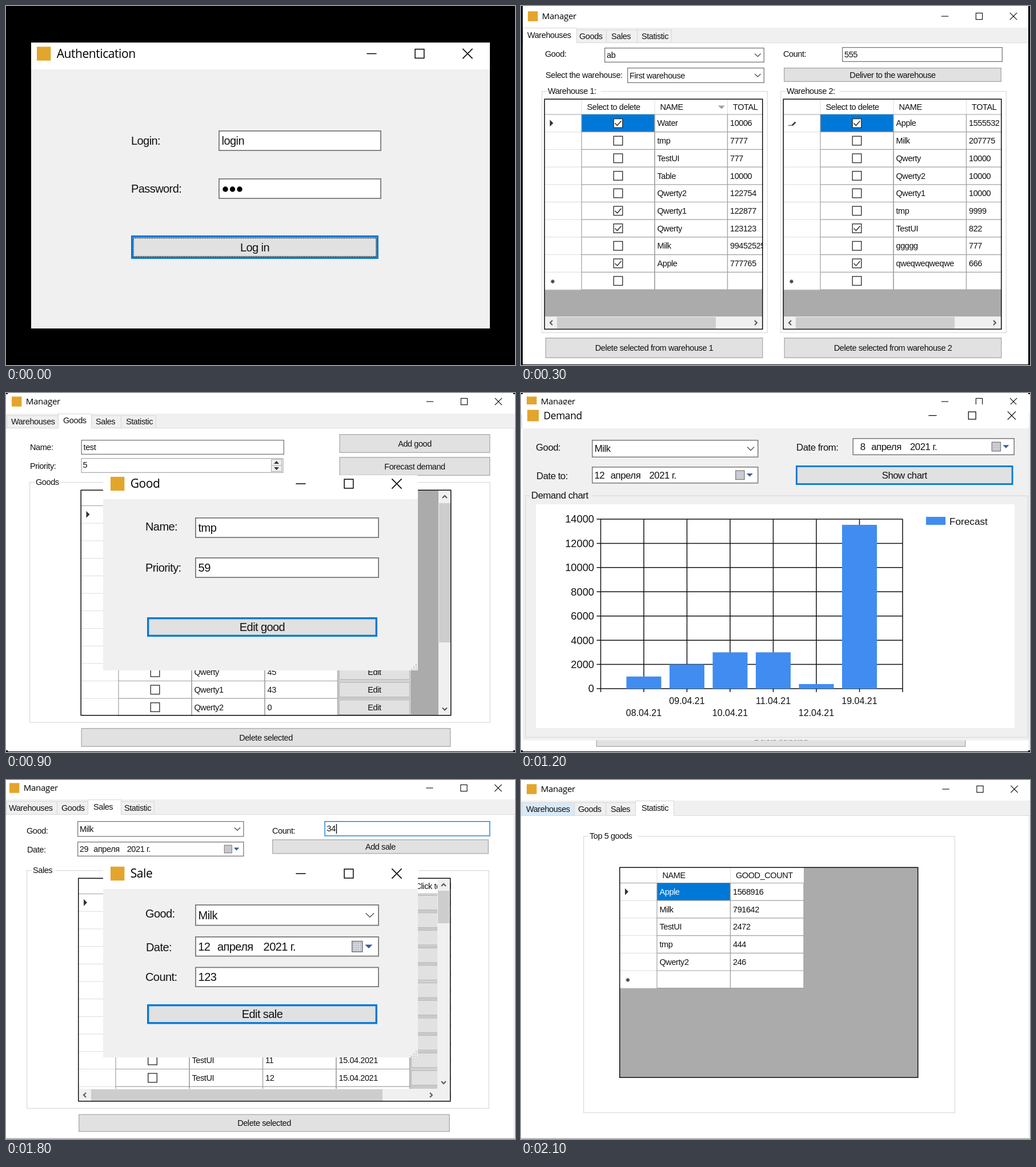
An HTML page that plays this animation: 891x629 px, repeating every 2400 ms.

```html
<!DOCTYPE html>
<html lang="en">
<head>
<meta charset="utf-8">
<title>Warehouse manager</title>
<style>
  html, body { margin: 0; width: 100%; height: 100%; overflow: hidden; background: #000; }
  #stage { display: block; width: 891px; height: 629px; }
  text { font-family: "Liberation Sans", Arial, sans-serif; letter-spacing: -.029em; }
  .title { font-family: "Open Sans", "Noto Sans", sans-serif; letter-spacing: -.02em; }
  .chart { letter-spacing: 0; }
  .scene { visibility: hidden; animation: show 2400ms step-end infinite; }
  @keyframes show {
    0% { visibility: visible; }
    12.5%, 100% { visibility: hidden; }
  }
</style>
</head>
<body>
<svg id="stage" viewBox="0 0 891 629"></svg>
<script>
const UI = 14.5, BLUE = '#0078d7', FACE = '#f0f0f0', LINE = '#dcdcdc', EDGE = '#7a7a7a', BUTTON = '#e1e1e1';

// Basic shapes; boxes are given by their outer edges
function rect(x0, y0, x1, y1, fill, stroke, w = 1) {
  const i = stroke ? w / 2 : 0;
  const pen = stroke ? ` stroke="${stroke}" stroke-width="${w}"` : '';
  return `<rect x="${x0 + i}" y="${y0 + i}" width="${x1 - x0 - 2 * i}" height="${y1 - y0 - 2 * i}" fill="${fill}"${pen}/>`;
}
const path = (d, stroke, w = 1, fill = 'none') => `<path d="${d}" stroke="${stroke}" stroke-width="${w}" fill="${fill}"/>`;
const fillPath = (d, fill) => `<path d="${d}" fill="${fill}"/>`;
const dot = (x, y, r, fill) => `<circle cx="${x}" cy="${y}" r="${r}" fill="${fill}"/>`;

function text(x, cy, s, size = UI, { anchor = 'start', fill = '#111', cls = '' } = {}) {
  return `<text class="${cls}" x="${x}" y="${cy + size * .35}" font-size="${size}" text-anchor="${anchor}" fill="${fill}">${s}</text>`;
}
const centred = (x, cy, s, size) => text(x, cy, s, size, { anchor: 'middle' });

// Thin arrow head: dx, dy is the direction it points in
function chevron(x, y, dx, dy, r, w = 1.4, colour = '#555') {
  const at = (a, b) => `${x + a * dx - b * dy},${y + a * dy + b * dx}`;
  return path(`M${at(-r / 2, r)} L${at(r / 2, 0)} L${at(-r / 2, -r)}`, colour, w);
}

// Controls
function caption(x, cy, name, size, minX) {
  const r = size * .41, gap = size * 4, half = size * .58;
  const maxX = minX + gap, endX = minX + 2 * gap, w = size / 14;
  return rect(x, cy - half, x + 2 * half, cy + half, '#e3a52c') +
    text(x + size * 1.65, cy, name, size, { cls: 'title', fill: '#000' }) +
    path(`M${minX - r},${cy}h${2 * r}`, '#000', w) +
    rect(maxX - r, cy - r, maxX + r, cy + r, 'none', '#000', w) +
    path(`M${endX - r},${cy - r}l${2 * r},${2 * r}m0,${-2 * r}l${-2 * r},${2 * r}`, '#000', w);
}

function field(x0, y0, x1, y1, s, size = UI, edge = EDGE) {
  return rect(x0, y0, x1, y1, '#fff', edge, size / 11) + text(x0 + size * .28, (y0 + y1) / 2, s, size);
}

function combo(x0, y0, x1, y1, s, size = UI) {
  return field(x0, y0, x1, y1, s, size) + chevron(x1 - size * .8, (y0 + y1) / 2, 0, 1, size * .36);
}

function date(x0, y0, x1, y1, day, size = UI) {
  const cy = (y0 + y1) / 2, x = x0 + size * .25, h = size * .5;
  const left = x1 - size * 2.4, right = x1 - size * 1.42, tri = x1 - size * .9;
  let s = field(x0, y0, x1, y1, '', size) +
    text(x + size * 1.07, cy, day, size, { anchor: 'end' }) +
    text(x + size * 1.7, cy, 'апреля', size) + text(x + size * 5.73, cy, '2021 г.', size) +
    rect(left, cy - h, right, cy + h, '#e4e4ea', '#77777f', size / 12);
  for (let i = 1; i < 5; i++) {
    s += path(`M${left + 2},${cy - h + i * h * .4}H${right - 2}`, '#a9a9b4', .8);
    s += path(`M${left + i * h * .39},${cy - h + 2}V${cy + h - 2}`, '#a9a9b4', .8);
  }
  const t = size * .33;
  return s + fillPath(`M${tri - t},${cy - t / 2}h${2 * t}l${-t},${t}z`, '#3c5a8c');
}

function button(x0, y0, x1, y1, s, size = UI, active = false) {
  return rect(x0, y0, x1, y1, BUTTON, active ? BLUE : '#adadad', active ? size / 6 : 1.4) +
    centred((x0 + x1) / 2, (y0 + y1) / 2, s, size);
}

function group(x0, y0, x1, y1, name, size = UI, back = '#fff') {
  return rect(x0, y0, x1, y1, 'none', LINE, 1.3) +
    rect(x0 + 9, y0 - 4, x0 + 13 + name.length * size * .52, y0 + 4, back) +
    text(x0 + 11, y0, name, size);
}

function check(x, y, on) {
  return rect(x - 8.5, y - 8.5, x + 8.5, y + 8.5, '#fff', '#333', 1.4) +
    (on ? path(`M${x - 5.5},${y}l4,4l7,-8`, '#333', 1.5) : '');
}

function marker(kind, x, y) {
  if (kind === 'arrow') return fillPath(`M${x + 10},${y - 6}l6,6l-6,6z`, '#333');
  if (kind === 'pen') return dot(x + 11, y + 4, 1, '#333') + dot(x + 14, y + 4, 1, '#333') + path(`M${x + 16},${y + 4}l6,-6`, '#333', 2.6);
  return dot(x + 15, y + 1, 2.6, '#333') + path(`M${x + 11},${y + 1}h8m-4,-4v8m-3,-7l6,6m0,-6l-6,6`, '#555', .8);
}

// Data grid; cols holds the column edges, the first column being the row header
function grid({ box, cols, top, heads, rows, first = 'arrow', fresh = false, extra = '' }) {
  const [x0, y0, x1, y1] = box, pitch = 30.7, right = cols[cols.length - 1];
  const list = fresh ? [...rows, [typeof rows[0][0] === 'boolean' ? false : '']] : rows;
  let s = rect(x0, y0, x1, y1, '#ababab') + rect(x0, y0, right, top + list.length * pitch, '#fff');
  heads.forEach((h, i) => {
    s += text(cols[i + 1] + 9.5, (y0 + top) / 2 + .5, h) + path(`M${cols[i + 1]},${y0}V${top}`, LINE);
  });
  s += path(`M${x0},${top}H${right}`, '#a0a0a0', 1.2);
  list.forEach((row, r) => {
    const y = top + r * pitch, cy = y + pitch / 2, end = y + pitch;
    if (!r) s += rect(cols[1], y, cols[2], end, BLUE);
    if (!r) s += marker(first, x0, cy);
    if (fresh && r === rows.length) s += marker('star', x0, cy);
    s += path(`M${x0},${end}H${cols[1]}`, LINE) + path(`M${cols[1]},${end}H${right}`, '#a0a0a0', 1.2);
    heads.forEach((h, i) => {
      const a = cols[i + 1], b = cols[i + 2], v = row[i];
      if (typeof v === 'boolean') s += check((a + b) / 2, cy, v);
      else if (h === 'Click to edit') s += button(a + 1.5, y + 1.5, b - 1.5, end - 1.5, 'Edit');
      else if (v) s += text(a + 4.5, cy, v, UI, { fill: !r && !i ? '#fff' : '#111' });
      s += path(`M${a},${y}V${end}M${b},${y}V${end}`, '#a0a0a0', 1.2);
    });
  });
  return `<svg x="${x0}" y="${y0}" width="${x1 - x0}" height="${y1 - y0}" viewBox="${x0} ${y0} ${x1 - x0} ${y1 - y0}">${s}${extra}</svg>` +
    rect(x0, y0, x1, y1, 'none', '#111', 1.5);
}

const hScroll = (x0, x1, y, a, b) => rect(x0, y, x1, y + 22, FACE) + rect(a, y + 1, b, y + 21, '#cdcdcd') +
  chevron(x0 + 11, y + 11, -1, 0, 4, 2) + chevron(a === x0 + 22 ? x1 - 11 : x1 - 11, y + 11, 1, 0, 4, 2);
const vScroll = (x, y0, y1, a, b) => rect(x, y0, x + 22, y1, FACE) + rect(x + 1, a, x + 21, b, '#cdcdcd') +
  chevron(x + 11, y0 + 11, 0, -1, 4, 2) + chevron(x + 11, y1 - 11, 0, 1, 4, 2);

function tabs(y, bottom, edges, xs, on, hover = -1) {
  const names = ['Warehouses', 'Goods', 'Sales', 'Statistic'];
  const tab = i => {
    const up = i === on;
    return rect(edges[i], up ? y : y + 3, edges[i + 1] + 1, bottom + 1, up ? '#fff' : i === hover ? '#d8eaf9' : FACE, LINE, 1.2) +
      (up ? rect(edges[i] + 1, bottom - 1, edges[i + 1], bottom + 2, '#fff') : '') +
      text(xs[i], (y + bottom) / 2 + (up ? -.5 : 1.5), names[i]);
  };
  const order = [0, 1, 2, 3].filter(i => i !== on);
  return rect(0, y, 891, bottom, FACE) + path(`M0,${bottom + .5}H891`, LINE) + [...order, on].map(tab).join('');
}

function dialog(y0, name, body) {
  return rect(170, y0, 721, 486, FACE) + rect(170, y0, 721, y0 + 42, '#fff') + caption(183, y0 + 15, name, 21, 516) + body +
    [[718, 476], [718, 480], [718, 484], [714, 480], [714, 484], [710, 484]].map(([x, y]) => dot(x, y, 1.1, '#b4b4b4')).join('');
}

// Scenes
function login() {
  return rect(44, 64, 847, 565, FACE) + rect(44, 64, 847, 111, '#fff') + caption(54, 83.5, 'Authentication', 21, 640) +
    text(219, 236, 'Login:', 20) + field(372, 218, 657, 254, 'login', 20) +
    text(219, 320, 'Password:', 20) + field(372, 302, 657, 338, '', 20) +
    [384, 396.5, 409].map(x => dot(x, 321, 4.7, '#000')).join('') +
    button(219, 402, 652, 443, 'Log in', 20, true) +
    '<rect x="223" y="406.5" width="425" height="32.5" fill="none" stroke="#000" stroke-width="1.4" stroke-dasharray="1.5 1.5"/>';
}

function stock(dx, n, rows, first) {
  const thumb = hScroll(42 + dx, 422 + dx, 544, 63 + dx, 341 + dx);
  const sort = first === 'arrow' ? fillPath('M345,174.5h12l-6,6z', '#a0a0a0') : '';
  return group(36 + dx, 149, 432 + dx, 573, `Warehouse ${n}:`) +
    grid({
      box: [40.5 + dx, 162.5, 423.5 + dx, 567], cols: [41, 106, 234, 361.5, 489].map(x => x + dx), top: 190,
      heads: ['Select to delete', 'NAME', 'TOTAL'], rows, first, fresh: true, extra: sort + thumb
    }) +
    button(42.5 + dx, 581, 423.5 + dx, 617, `Delete selected from warehouse ${n}`);
}

function warehouses() {
  const left = [[true, 'Water', '10006'], [false, 'tmp', '7777'], [false, 'TestUI', '777'], [false, 'Table', '10000'],
    [false, 'Qwerty2', '122754'], [true, 'Qwerty1', '122877'], [true, 'Qwerty', '123123'], [false, 'Milk', '994525252'], [true, 'Apple', '777765']];
  const right = [[true, 'Apple', '1555532'], [false, 'Milk', '207775'], [false, 'Qwerty', '10000'], [false, 'Qwerty2', '10000'],
    [false, 'Qwerty1', '10000'], [false, 'tmp', '9999'], [true, 'TestUI', '822'], [false, 'ggggg', '777'], [true, 'qweqweqweqwe', '666']];
  return rect(3, 0, 888, 628, '#fff') + caption(12, 18, 'Manager', 15, 742) +
    tabs(38, 64, [3, 97, 149, 203, 263], [11, 102, 158, 211], 0) +
    text(42, 84, 'Good:') + combo(146, 73, 426, 99, 'ab') + text(459, 84, 'Count:') + field(562, 72, 843, 98, '555') +
    text(43, 121, 'Select the warehouse:') + combo(186, 108, 426, 135, 'First warehouse') +
    button(460, 108, 841, 133, 'Deliver to the warehouse') +
    stock(0, 1, left, 'arrow') + stock(418, 2, right, 'pen') +
    rect(0, 0, 3, 629, '#000') + rect(888, 0, 891, 629, '#000');
}

function goods() {
  const rows = [[true, 'tmp', '59'], [false, 'rewq54rtg', '1'], [false, 'ab', '44'], [false, 'TestUI', '7'], [false, 'rewq', '2'],
    [true, 'Milk', '14'], [true, 'Apple', '26'], [false, 'Table', '1'], [false, 'Water', '100'], [false, 'Qwerty', '45'],
    [false, 'Qwerty1', '43'], [false, 'Qwerty2', '0']];
  return rect(3, 0, 888, 628, '#fff') + rect(0, 2, 891, 626, '#fff') + caption(10, 15, 'Manager', 15, 742) +
    tabs(36, 61, [1, 91, 149, 201, 262], [9, 100, 157, 210], 1) + path('M889.5,62V626', LINE) +
    text(42, 95, 'Name:') + field(131.5, 82, 487, 108, 'test') +
    text(42, 128, 'Priority:') + field(131.5, 114, 485.5, 140, '', UI, '#adadad') + text(134.5, 126, '5') +
    rect(464, 116, 483, 138, FACE, '#adadad') + path('M464,127H483', '#adadad') +
    fillPath('M469,124h9l-4.5,-5zM469,130h9l-4.5,5z', '#333') +
    button(583.5, 72, 847.5, 105, 'Add good') + button(583.5, 112, 847.5, 145, 'Forecast demand') +
    group(41, 156, 848, 578, 'Goods') +
    grid({
      box: [130.5, 169.5, 779.5, 565.5], cols: [131, 197, 325, 453, 581, 709], top: 197.5,
      heads: ['Select to delete', 'NAME', 'PRIORITY', 'Click to edit'], rows,
      extra: vScroll(757, 171, 564.5, 193, 437)
    }) +
    button(131.5, 587, 778.5, 620, 'Delete selected');
}

function editGood() {
  return goods() + dialog(144, 'Good',
    text(244, 234, 'Name:', 20) + field(331, 218, 653, 254, 'tmp', 20) +
    text(244, 306, 'Priority:', 20) + field(331, 288, 653, 324, '59', 20) +
    button(247, 393, 650, 427, 'Edit good', 20, true));
}

function chart() {
  const x0 = 139.5, y0 = 221, base = 518, step = 75.5, scale = (base - y0) / 14000;
  const days = ['08', '09', '10', '11', '12', '19'], values = [1000, 2000, 3000, 3000, 380, 13530];
  let s = rect(26, 195, 864, 587, '#fff');
  for (let v = 0; v <= 14000; v += 2000) {
    const y = base - v * scale;
    s += path(`M${x0 - 7},${y}H668`, '#111', 1.5) + text(128, y, v, 18.3, { anchor: 'end', cls: 'chart' });
  }
  for (let i = 0; i < 8; i++) s += path(`M${x0 + i * step},${y0}V${base + 6}`, '#111', 1.5);
  values.forEach((v, i) => {
    const x = x0 + (i + 1) * step;
    s += rect(x - 30.5, base - v * scale, x + 30.5, base, '#418cf0') +
      text(x, i % 2 ? 539 : 560, `${days[i]}.04.21`, 16, { anchor: 'middle', cls: 'chart' });
  });
  return s + rect(709, 217, 743, 231, '#418cf0') + text(750, 225, 'Forecast', 17.2, { cls: 'chart' });
}

function demand() {
  const size = 16.8;
  return goods() + rect(3, 20, 889, 608.5, FACE) + rect(2, 20, 889, 62, '#fff') + caption(11, 39.5, 'Demand', 17.3, 720.5) +
    text(26, 95, 'Good:', size) + combo(124, 82, 415.5, 113, 'Milk', size) +
    text(482, 95, 'Date from:', size) + date(580.5, 79, 864, 109, '8', size) +
    text(27, 145, 'Date to:', size) + date(124, 129, 415.5, 158.5, '12', size) +
    button(481, 127, 861.5, 161, 'Show chart', size, true) +
    group(7, 179.5, 888, 604, 'Demand chart', size, FACE) + chart();
}

function sales() {
  const names = ['Milk', 'Milk', 'Apple', 'Apple', 'Milk', 'Qwerty2', 'tmp', 'TestUI', 'TestUI', 'TestUI', 'TestUI', 'TestUI'];
  const counts = [123, 1000, 2000, 3000, 400, 246, 444, 9, 10, 11, 12, 13];
  const rows = names.map((n, i) => [false, n, String(counts[i]), `${i < 7 ? 12 : 15}.04.2021`]);
  return rect(0, 0, 891, 629, '#fff') + rect(0, 627.5, 891, 629, '#b0b0b0') + caption(6, 14, 'Manager', 15, 741.5) +
    tabs(34, 60, [0, 89, 143, 201, 259], [5, 97, 153, 207], 2) + path('M889.5,60V627', LINE) +
    text(36, 89, 'Good:') + combo(125, 72, 416.5, 99.5, 'Milk') + text(37, 122, 'Date:') + date(125, 108, 416.5, 134, '29') +
    text(466, 89, 'Count:') + field(557.5, 72, 847.5, 98.5, '34', UI, BLUE) + path('M578.5,77V94', '#000', 1.3) +
    button(466, 104, 845, 129.5, 'Add sale') +
    group(36, 158, 846, 576, 'Sales') +
    grid({
      box: [126, 171.5, 778.5, 563.5], cols: [126, 192, 321, 449.5, 578, 707, 835], top: 199.5,
      heads: ['Select to delete', 'NAME', 'COUNT', 'DATE', 'Click to edit'], rows,
      extra: vScroll(755, 173, 541, 194, 251) + hScroll(127, 755, 541, 149, 659) + rect(755, 541, 778, 563, FACE)
    }) +
    button(127, 585.5, 777, 616.5, 'Delete selected');
}

function editSale() {
  return sales() + dialog(149, 'Sale',
    text(244, 234, 'Good:', 20) + combo(331, 218, 653, 255.5, 'Milk', 20) +
    text(245, 293, 'Date:', 20) + date(331, 274, 653, 309.5, '12', 20) +
    text(244, 345, 'Count:', 20) + field(331, 327.5, 653, 363, '123', 20) +
    button(247, 393, 650, 427.5, 'Edit sale', 20, true));
}

function statistic() {
  const rows = [['Apple', '1568916'], ['Milk', '791642'], ['TestUI', '2472'], ['tmp', '444'], ['Qwerty2', '246']];
  return rect(0, 0, 891, 629, '#fff') + rect(0, 627.5, 891, 629, '#b0b0b0') + caption(10, 16, 'Manager', 15, 743.5) +
    tabs(36, 62, [1, 93, 148, 200, 267], [9, 100, 157, 211], 3, 0) + path('M889.5,62V627', LINE) +
    group(109, 98, 760, 583.5, 'Top 5 goods') +
    grid({ box: [172, 152.5, 695.5, 522], cols: [173, 238, 366.5, 495], top: 180.5, heads: ['NAME', 'GOOD_COUNT'], rows, fresh: true });
}

const scenes = [login, warehouses, goods, editGood, demand, sales, editSale, statistic];
document.getElementById('stage').innerHTML = scenes.map((draw, i) =>
  `<g class="scene" style="animation-delay:${i * 300 - 2400}ms">${draw()}</g>`).join('');
</script>
</body>
</html>
```
